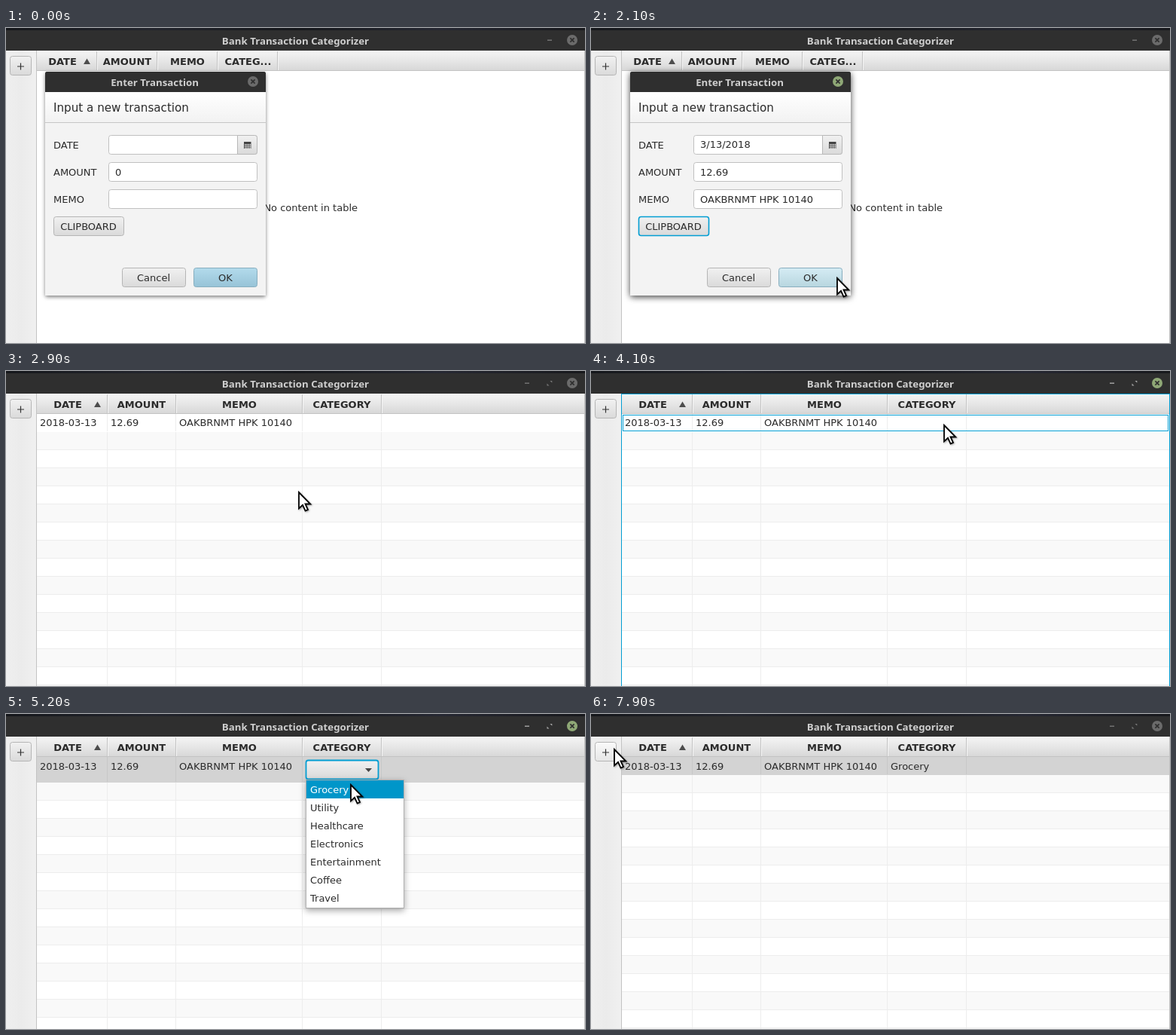
These frames come from a looping animation (769 by 418 pixels, 8 s). An HTML page:

```html
<!DOCTYPE html>
<html lang="en">
<head>
<meta charset="utf-8">
<title>Bank Transaction Categorizer</title>
<style>
html, body { margin: 0; width: 100%; height: 100%; overflow: hidden; background: #fff; }
svg { display: block; width: 100%; height: 100%; }
text { font: 13px "DejaVu Sans", sans-serif; fill: #2b2b2b; white-space: pre; }
.head { font-weight: bold; }
.bar { font: bold 13.25px "Noto Sans", "Open Sans", sans-serif; fill: #cfcfcf; }
.big { font-size: 15.17px; }
.mid { text-anchor: middle; }
</style>
</head>
<body>
<svg id="stage" viewBox="0 0 769 418"></svg>
<script>
const LOOP = 8000, STEP = 100;
const BLUE = '#0096c9', RING = '#039ed3';
const MEMO = 'OAKBRNMT HPK 10140';
const CATEGORIES = ['Grocery', 'Utility', 'Healthcare', 'Electronics', 'Entertainment', 'Coffee', 'Travel'];
const COLS = [134, 225, 393, 498];

const rect = (x, y, w, h, fill, more = '') =>
  `<rect x="${x}" y="${y}" width="${w}" height="${h}" fill="${fill}" ${more}/>`;
const text = (x, y, s, cls = '', more = '') =>
  `<text x="${x}" y="${y}" class="${cls}" ${more}>${s}</text>`;
const path = (d, more) => `<path d="${d}" ${more}/>`;
const group = (id, body, more = '') => `<g id="${id}" ${more}>${body}</g>`;
const grad = (id, stops, flat) =>
  `<linearGradient id="${id}" x2="${flat ? 1 : 0}" y2="${flat ? 0 : 1}">` +
  stops.map((c, i) => `<stop offset="${i / (stops.length - 1)}" stop-color="${c}"/>`).join('') +
  '</linearGradient>';
const box = (id, x, y, w, h, fill = 'url(#btn)', line = '#b5b5b5') =>
  rect(x + .5, y + .5, w - 1, h - 1, fill, `id="${id}" rx="3" stroke="${line}"`);
const closeIcon = (id, x, y) =>
  `<circle id="${id}" cx="${x}" cy="${y}" r="7"/>` +
  path(`M${x - 2.6} ${y - 2.6}l5.2 5.2m0 -5.2l-5.2 5.2`, 'stroke="#2f2f2f" stroke-width="1.7"');
const sortArrow = x => path(`M${x - 4.5} 48h9l-4.5 -7.5z`, 'fill="#4d4d4d"');

function header(lines, labels, arrowX) {
  return lines.map(x => rect(x, 31, 1, 25, '#c3c3c3') + rect(x + 1, 31, 1, 25, '#f5f5f5')).join('') +
    labels.map(([x, s]) => text(x, 49, s, 'head mid')).join('') + sortArrow(arrowX);
}

function emptyRows() {
  let out = '';
  for (let i = 0; i < 15; i++) {
    const y = 81 + i * 24;
    out += rect(41, y, 727, 24, i % 2 ? '#fff' : '#f9f9f9') + rect(41, y - 1, 727, 1, '#ededed');
  }
  return out + COLS.map(x => rect(x, 57, 1, 380, '#ededed')).join('');
}

function dialog() {
  const field = (y, label, id) =>
    text(63, y + 18, label) + box('', 136, y, 198, 26, '#fff', '#c0c0c0') + text(145, y + 18, '', '', `id="${id}"`);
  let dots = '';
  for (let i = 0; i < 12; i++) dots += rect(317 + i % 4 * 2.2, 154 + (i / 4 | 0) * 2.2, 1.5, 1.5, '#e4e4e4');
  return rect(52, 58, 293, 297, '#2f2f2f', 'id="shade" rx="3"') +
    rect(52, 85, 293, 270, '#f3f3f3') +
    path('M52 85V61q0 -3 3 -3h287q3 0 3 3v24z', 'fill="#2f2f2f"') +
    text(197.5, 77, 'Enter Transaction', 'bar mid') + closeIcon('dlgClose', 328, 71) +
    rect(52, 85, 293, 40, 'url(#panel)') + rect(52, 125, 293, 1, '#c6c6c6') +
    text(63, 111, 'Input a new transaction', 'big') +
    field(142, 'DATE', 'date') + field(178, 'AMOUNT', 'amount') + field(214, 'MEMO', 'memo') +
    path('M307.5 142.5h23q3 0 3 3v19q0 3 -3 3h-23z', 'fill="url(#btn)" stroke="#b8b8b8"') +
    rect(316, 151, 9.5, 9, '#444') + dots +
    box('clip', 63, 250, 94, 26) + text(109.5, 268, 'CLIPBOARD', 'mid') +
    box('', 154, 318, 85, 26) + text(196, 336, 'Cancel', 'mid') +
    box('ok', 249, 318, 85, 26, 'url(#ok0)', '#88aebf') + text(291.5, 336, 'OK', 'mid');
}

function popup() {
  return rect(398.5, 87.5, 130, 170, '#fff', 'stroke="#b0b0b0" filter="url(#soft)"') +
    rect(399, 88, 129, 24, BLUE, 'id="hover"') +
    CATEGORIES.map((s, i) => text(404, 105 + i * 24, s, '', `id="cat${i}"`)).join('');
}

const stage = document.getElementById('stage');
stage.innerHTML = '<defs>' +
  grad('top', ['#15171b', '#23252d', '#15171b', '#262832', '#17181c'], true) +
  grad('side', ['#efefef', '#ebebeb', '#f0f0f0'], true) +
  grad('head', ['#f5f5f5', '#e7e7e7', '#d8d8d8']) +
  grad('btn', ['#f1f1f1', '#dadada']) + grad('lit', ['#fafafa', '#e6e6e6']) +
  grad('ok0', ['#b3dbec', '#97c3d7']) + grad('ok1', ['#d5ecf4', '#b8d6df']) +
  grad('panel', ['#fff', '#f2f2f2']) +
  '<filter id="soft" x="-20%" y="-20%" width="140%" height="140%"><feDropShadow dx="0" dy="3" stdDeviation="4" flood-opacity=".35"/></filter>' +
  '<filter id="shadow" x="-20%" y="-20%" width="140%" height="140%"><feDropShadow id="drop" dx="0" dy="2" stdDeviation="3"/></filter>' +
  '</defs>' +
  rect(0, 0, 769, 418, '#fff') + rect(0, 0, 769, 4, 'url(#top)') + rect(0, 3, 769, 27, '#2f2f2f') +
  text(384.5, 22, 'Bank Transaction Categorizer', 'bar mid') +
  closeIcon('mainClose', 752, 16) + rect(719, 15.5, 6, 1.4, '#888', 'id="mini"') +
  group('maxi', path('M722.5 13h2.8v2.8zM718.5 16.5v3h3z', 'fill="#888"')) +
  rect(0, 30, 40, 388, 'url(#side)') + box('plus', 5, 37, 29, 26) +
  path('M19.5 46.5v9m-4.5 -4.5h9', 'stroke="#333" stroke-width="1.2"') +
  rect(40, 30, 1, 388, '#c3c3c3') + rect(41, 30, 727, 26, 'url(#head)') + rect(41, 56, 727, 1, '#c3c3c3') +
  group('empty',
    header([120, 200, 280, 360], [[75, 'DATE'], [161, 'AMOUNT'], [241, 'MEMO'], [321.5, 'CATEG...']], 107.5) +
    text(342.4, 243, 'No content in table')) +
  group('table',
    group('rows', emptyRows()) +
    group('row',
      rect(41, 57, 727, 24, '#fff', 'id="rowBg"') +
      COLS.map(x => rect(x, 57, 1, 23, '#ededed', 'class="cell"')).join('') +
      rect(42.5, 58.5, 724, 21, 'none', 'id="rowRing"') +
      group('rowText', [[45, '2018-03-13'], [139, '12.69'], [230, MEMO]].map(([x, s]) => text(x, 73, s)).join('') +
        text(398, 73, 'Grocery', '', 'id="chosen"'))) +
    header(COLS, [[82, 'DATE'], [180, 'AMOUNT'], [310, 'MEMO'], [446, 'CATEGORY']], 121.5) +
    group('combo', rect(398.5, 61.5, 96, 25, 'url(#btn)', 'id="comboBox" rx="3"') +
      path('M477 72h9l-4.5 5z', 'fill="#444"')) +
    group('popup', popup())) +
  rect(768, 30, 1, 388, '#c3c3c3') +
  rect(40.5, 30.5, 728, 400, 'none', `id="tableRing" stroke="${RING}"`) +
  group('dialog', dialog()) +
  group('cursor', path('M1 1V22.5L6 17.8L9.6 25.6L13 24L9.5 16.5H16.3Z',
    'fill="#fff" stroke="#000" stroke-width="1.8" filter="url(#tip)"')) +
  '<filter id="tip" x="-30%" y="-30%" width="170%" height="170%"><feDropShadow dx="1" dy="1" stdDeviation="1" flood-opacity=".35"/></filter>';

const el = {};
stage.querySelectorAll('[id]').forEach(n => { if (n.id) el[n.id] = n; });
const show = (id, on) => { el[id].style.display = on ? '' : 'none'; };
const set = (id, name, v) => el[id].setAttribute(name, v);

// Pointer visits: each is a run of [time, x, y].
const VISITS = [
  [[500, -8, 176], [700, 28, 202], [900, 76, 232], [1100, 108, 253], [1300, 122, 260],
   [1500, 122, 260], [1600, 134, 264], [1800, 210, 292], [2000, 306, 324], [2100, 326, 331],
   [2400, 326, 331], [2600, 352, 258], [2800, 382, 176], [2900, 388, 160],
   [3100, 388, 160], [3400, 422, 107], [3500, 422, 107], [3800, 446, 86], [4100, 468, 71], [4200, 470, 70],
   [4900, 470, 70], [5000, 466, 80], [5100, 460, 89], [5200, 457, 93], [5300, 456, 91],
   [5400, 456, 91], [5500, 428, 115], [5600, 398, 138], [5800, 398, 138], [5900, 120, 88], [6000, 120, 88]],
  [[7500, -10, 43], [7600, -12, 43], [7700, -12, 43], [7800, 14, 45], [7900, 30, 46], [8000, 30, 46]]
];

function pointer(t) {
  const run = VISITS.find(v => t >= v[0][0] && t < v[v.length - 1][0]);
  if (!run) return null;
  const i = run.findIndex(k => k[0] > t);
  const [t0, x0, y0] = run[i - 1], [t1, x1, y1] = run[i];
  const p = (t - t0) / (t1 - t0);
  return [x0 + (x1 - x0) * p, y0 + (y1 - y0) * p];
}

function draw(t) {
  const within = (a, b) => t >= a && t < b;
  const at = pointer(t);
  show('cursor', at);
  if (at) set('cursor', 'transform', `translate(${at[0]} ${at[1]})`);

  // Dialog
  const active = t >= 800, pasted = t >= 1400;
  show('dialog', t < 2600);
  el.dialog.style.opacity = t < 2400 ? 1 : t < 2500 ? .65 : .3;
  set('shade', 'filter', 'url(#shadow)');
  set('drop', 'stdDeviation', active ? 4.5 : 2.6);
  set('drop', 'flood-opacity', active ? .75 : .5);
  set('dlgClose', 'fill', active ? '#8fa876' : '#6b6b6b');
  el.date.textContent = pasted ? '3/13/2018' : '';
  set('date', 'y', 159);
  el.amount.textContent = pasted ? '12.69' : '0';
  el.memo.textContent = pasted ? MEMO : '';
  set('clip', 'stroke', pasted ? RING : '#b5b5b5');
  set('clip', 'stroke-width', pasted ? 1.6 : 1);
  set('clip', 'fill', within(1100, 1800) ? 'url(#lit)' : 'url(#btn)');
  set('ok', 'fill', within(1900, 2500) ? 'url(#ok1)' : 'url(#ok0)');

  // Main window
  const filled = t >= 2400, focused = within(3300, 6900);
  const icon = focused ? '#a8a8a8' : '#777';
  show('empty', !filled);
  show('table', filled);
  show('maxi', filled);
  set('mini', 'x', filled ? 689 : 719);
  set('mini', 'fill', icon);
  el.maxi.firstChild.setAttribute('fill', icon);
  set('mainClose', 'fill', focused ? '#8fa876' : '#6b6b6b');
  set('plus', 'fill', t >= 7800 ? 'url(#lit)' : 'url(#btn)');

  // First row
  const editing = within(4400, 5300), open = within(4600, 5300);
  const blue = within(4200, 4600) || within(5300, 6900), grey = open || t >= 6900;
  const tall = editing ? 10 : 0;
  show('tableRing', focused && !open);
  set('rows', 'transform', `translate(0 ${tall})`);
  set('rowBg', 'height', 24 + tall);
  set('rowBg', 'fill', blue ? BLUE : grey ? '#d3d3d3' : '#fff');
  stage.querySelectorAll('.cell').forEach(c => {
    c.setAttribute('height', 23 + tall);
    c.setAttribute('fill', blue ? '#2ea8d2' : grey ? '#c8c8c8' : '#ededed');
  });
  show('rowRing', focused && !open);
  set('rowRing', 'height', 21 + tall);
  set('rowRing', 'stroke', blue ? '#45b3d9' : RING);
  set('rowText', 'transform', `translate(0 ${t >= 4200 ? 1 : 0})`);
  for (const n of el.rowText.children) n.style.fill = blue ? '#fff' : '';
  show('chosen', t >= 5300);

  // Category picker
  const hover = within(5100, 5300);
  show('combo', editing);
  set('comboBox', 'stroke', open ? RING : '#b5b5b5');
  set('comboBox', 'stroke-width', open ? 1.8 : 1);
  show('popup', open);
  show('hover', hover);
  el.cat0.style.fill = hover ? '#fff' : '';
}

let start;
function tick(now) {
  start ??= now;
  const t = (now - start) % LOOP;
  draw(Math.floor(t / STEP) * STEP);
  requestAnimationFrame(tick);
}
draw(0);
requestAnimationFrame(tick);
</script>
</body>
</html>
```
